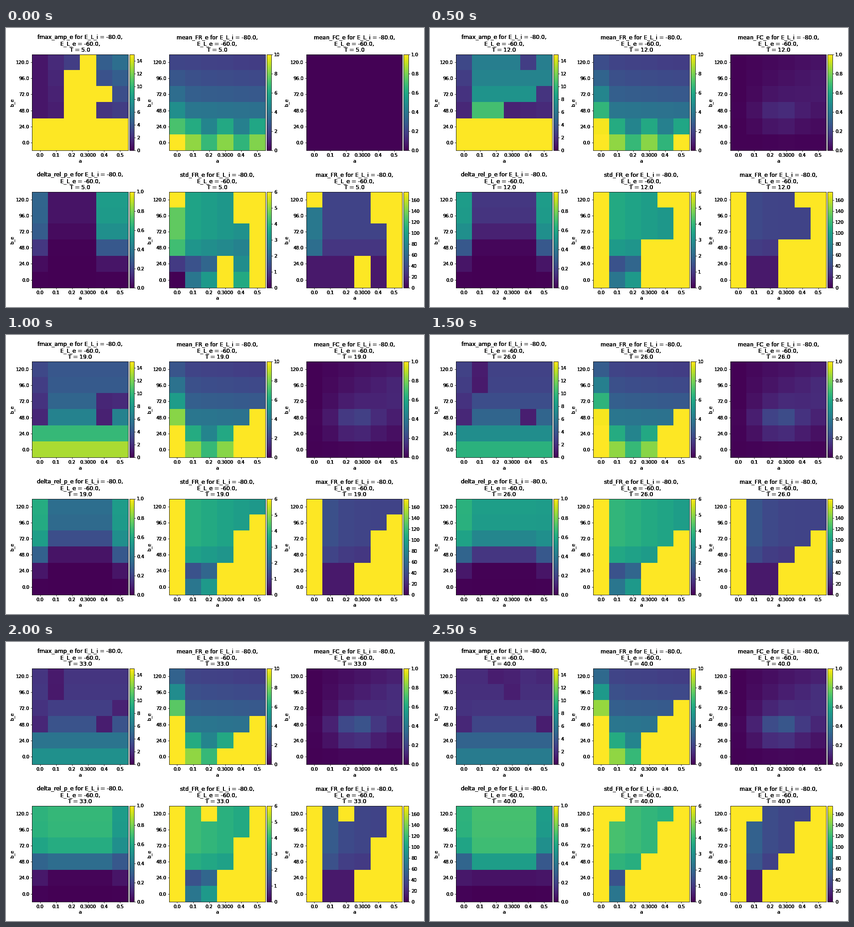
Animation, 917 px wide and 611 px high, one loop 3 s. Source, as a matplotlib script:

```python
import numpy as np
import matplotlib.pyplot as plt
from matplotlib.animation import FuncAnimation

W, H, DPI = 917, 611, 64
LEFT, TOP, PITCH, SIDE = 57.1, 57.7, 300.8, 210.6
STEPS = 6
U, B = np.meshgrid(np.arange(6), np.arange(5, -1, -1))  # steps of a and b_e

plt.rcParams.update({
    "font.family": "DejaVu Sans",
    "font.size": 11.46,
    "axes.linewidth": 0.95,
    "xtick.major.width": 0.95,
    "ytick.major.width": 0.95,
    "xtick.major.size": 3.4,
    "ytick.major.size": 3.4,
})

fig = plt.figure(figsize=(W / DPI, H / DPI), dpi=DPI, facecolor="white")


def box(x, y, w, h):
    """Axes placed in pixels from the top left corner."""
    return fig.add_axes([x / W, 1 - (y + h) / H, w / W, h / H])


def darken(text):
    """Paint a text several times, which makes its soft edges heavier."""
    paint = text.draw

    def draw(renderer):
        for _ in range(6):
            paint(renderer)

    text.draw = draw


def beyond(first, slope):
    """Cells to the right of a staircase that climbs with b_e."""
    return U >= np.floor(first + slope * B)


def blocks(*rects):
    """Cells inside any of the blocks (u0, u1, b0, b1)."""
    mask = np.zeros(U.shape, bool)
    for u0, u1, b0, b1 in rects:
        mask |= (U >= u0) & (U <= u1) & (B >= b0) & (B <= b1)
    return mask


# Key points per step: staircase edges, lone bursts and silent cells.
MEAN_EDGE = [(6, 0), (5, 1), (4, 0.7), (4, 0.7), (3, 1), (3, 0.75)]
BURST_EDGE = [(5, 0), (3, 0.7), (3, 0.6), (3, 0.75), (3, 0.5), (2, 0.7)]
BURSTS = {
    0: [(0, 0, 5, 5), (4, 4, 4, 5), (3, 3, 0, 1)],
    1: [(3, 3, 2, 2), (4, 5, 5, 5)],
    4: [(2, 2, 5, 5)],
    5: [(1, 1, 5, 5)],
}
SILENT = {
    0: [(0, 1, 2, 5), (4, 5, 2, 2), (5, 5, 3, 3), (2, 2, 5, 5), (4, 5, 4, 5)],
    1: [(4, 4, 5, 5), (3, 5, 2, 2), (5, 5, 3, 3)],
    2: [(4, 4, 2, 3), (5, 5, 3, 3)],
    3: [(4, 4, 2, 2), (1, 1, 4, 5)],
    4: [(4, 4, 2, 2), (5, 5, 3, 3), (1, 1, 4, 5)],
    5: [(5, 5, 2, 2), (5, 5, 5, 5), (2, 3, 5, 5), (3, 3, 4, 4)],
}


# Each rule gives the grid of step k in percent of the colour scale.

def fmax(k):
    v = (510 + 1150 * np.exp(-(B / 1.75) ** 1.6)) / (5 + 7 * k)
    v = np.where((U == 0) & (B > 1), np.minimum(v, 4 + 3.5 * B), v)
    return np.where(blocks(*SILENT[k]), 6 + 1.2 * U * B / (1 + k), v)


def mean(k):
    base = 14 + 62 * np.exp(-B / 2.3)
    first = base * (1.4 - 0.08 * B + k * (0.6 - 0.095 * B))
    rest = base - 0.6 * U - 8 * np.cos(np.pi * U) * (B < 2)
    v = np.where(U == 0, first, rest)
    return np.where(beyond(*MEAN_EDGE[k]), 100, v)


def conn(k):
    bump = np.exp(-((U - 2.6) / 1.5) ** 2 - (B - 1.8) ** 2)
    wide = U / 5 * np.exp(-((B - 3.5) / 2.2) ** 2)
    return 0.5 + 26 * (1 - np.exp(-k / 2)) * bump + 14 * (1 - np.exp(-k / 1.5)) * wide


def delta(k):
    start = 2 + 0.06 * (5 - B) ** 3.2
    inner = 72 / (1 + np.exp(-1.25 * (k - start)))
    side = 65 / (1 + np.exp(-2.2 * (B - 2)))
    v = np.where(U == 0, side * (1 - 0.5 * np.exp(-1.2 * k)), inner)
    return np.where(U > (4 if k else 3), 0.85 * side, v)


def burst(k):
    mask = beyond(*BURST_EDGE[k]) | blocks(*BURSTS.get(k, []))
    return mask | (U == 0) & (k > 0)


def std(k):
    v = 60.5 + 2.6 * k - 2.5 * U - 6 * (B < 3) + 15 * (U == 0)
    v = np.where(B == 1, 17 + 8 * U, v)
    v = np.where(B == 0, 62 * (1 - np.exp(-U)), v)
    return np.where(burst(k), 100, v)


def peak(k):
    v = 20 + 2.2 * k * np.exp(1.2 - 1.2 * U) - 4 * (B < 3) + 20 * (U == 0)
    return np.where(burst(k), 100, np.where(B < 2, 7, v))


class Panel:
    def __init__(self, name, rule, col, line, top, step):
        self.name, self.rule, self.top = name, rule, top
        x, y = LEFT + PITCH * col, TOP + PITCH * line
        ax = box(x, y, SIDE, SIDE)
        self.image = ax.imshow(
            np.zeros((6, 6)), cmap="viridis", vmin=0, vmax=top,
            aspect="auto", interpolation="nearest")
        ax.set_xticks(range(6), ["0.0", "0.1", "0.2", "0.3000", "0.4", "0.5"])
        ax.set_yticks(range(6), [f"{24.0 * i:.1f}" for i in range(5, -1, -1)])
        ax.set_xlabel("a", labelpad=2.5)
        ax.set_ylabel("b_e", labelpad=3.5)
        self.title = ax.set_title("", pad=6, linespacing=1.12)
        cax = box(x + SIDE + 3, y, 10.5, SIDE)
        fig.colorbar(self.image, cax=cax, ticks=np.arange(0, top * 1.001, step))
        for text in [self.title, ax.xaxis.label, ax.yaxis.label,
                     *ax.get_xticklabels(), *ax.get_yticklabels(),
                     *cax.get_yticklabels()]:
            darken(text)

    def show(self, k):
        self.image.set_data(self.rule(k) * self.top / 100)
        self.title.set_text(f"{self.name} for E_L_i = -80.0,\n"
                            f"E_L_e = -60.0,\nT = {5.0 + 7 * k:.1f}")


panels = [
    Panel("fmax_amp_e", fmax, 0, 0, 15, 2),
    Panel("mean_FR_e", mean, 1, 0, 10, 2),
    Panel("mean_FC_e", conn, 2, 0, 1, 0.2),
    Panel("delta_rel_p_e", delta, 0, 1, 1, 0.2),
    Panel("std_FR_e", std, 1, 1, 6, 1),
    Panel("max_FR_e", peak, 2, 1, 175, 20),
]


def update(k):
    for panel in panels:
        panel.show(k)
    return []


anim = FuncAnimation(fig, update, frames=STEPS, interval=500,
                     repeat=True, blit=False)
plt.show()
```
